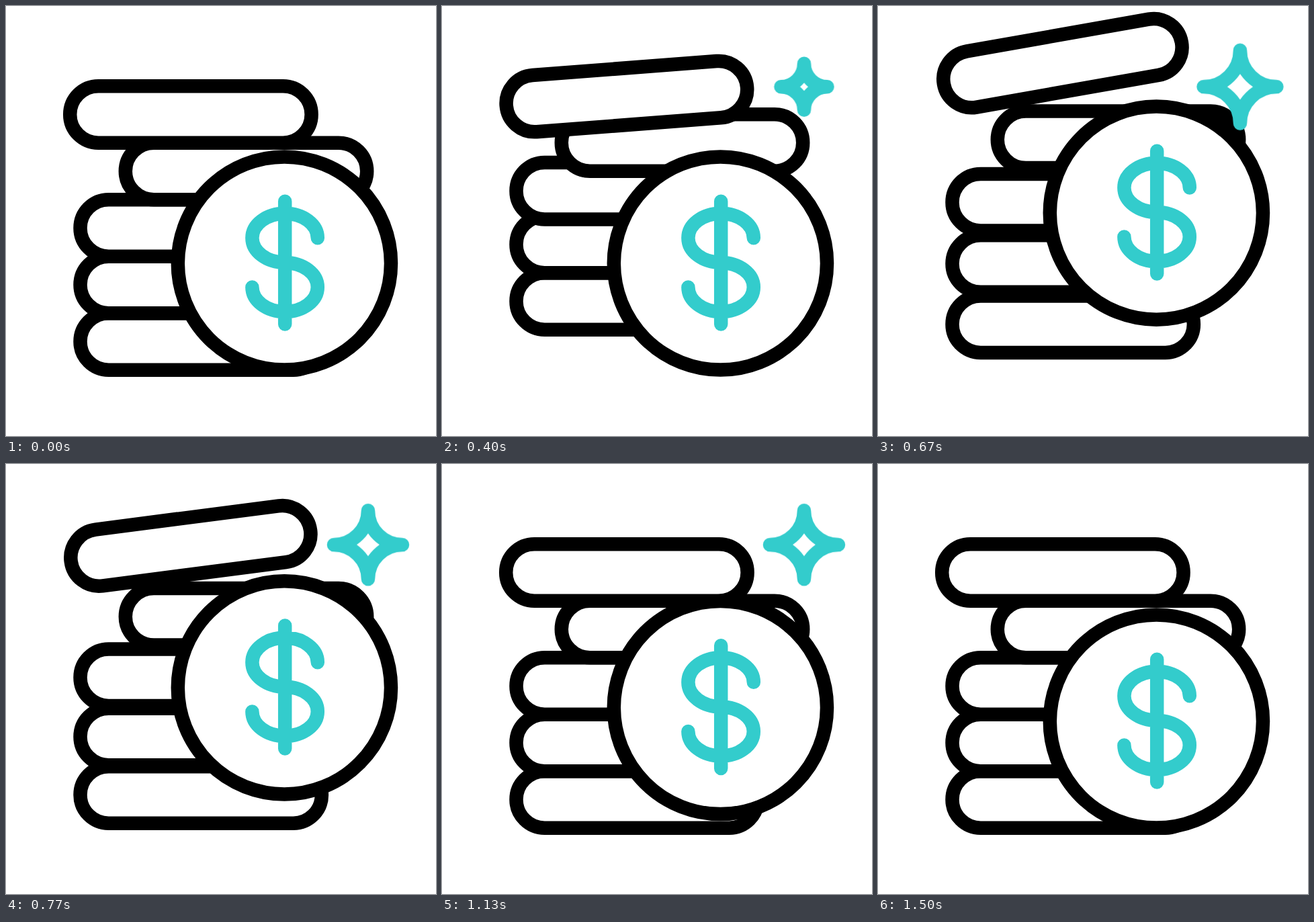
Animation of 640 by 640 pixels, one loop 2000 ms. Source, as an HTML page:

```html
<!DOCTYPE html>
<html lang="en">
<head>
<meta charset="utf-8">
<title>Coin stack</title>
<style>
  html, body { margin: 0; width: 100%; height: 100%; overflow: hidden; background: #fff; }
  svg { display: block; width: 100vw; height: 100vh; }

  .ink { fill: #fff; stroke: #000; stroke-width: 20.5; }
  .accent { fill: none; stroke: #3cc; stroke-width: 20.5; stroke-linecap: round; stroke-linejoin: round; }

  .move {
    animation-duration: 2s;
    animation-iteration-count: infinite;
    animation-timing-function: cubic-bezier(.333, 0, .667, 1);
  }
  .bar1 { animation-name: lift1, tilt; transform-box: fill-box; transform-origin: center; }
  .bar2 { animation-name: lift2; }
  .bar3 { animation-name: lift3; }
  .bar4 { animation-name: lift4; }
  .bar5 { animation-name: lift5; }
  .coin { animation-name: hop; }
  .star { animation-name: pop; vector-effect: non-scaling-stroke; }

  @keyframes lift5 {
    0%, 42.95%, 100% { translate: 0 0; }
    16.65%, 22.2% { translate: 0 -60px; }
  }
  @keyframes lift4 {
    0%, 3.1%, 43.1%, 100% { translate: 0 0; }
    19.8%, 24.55% { translate: 0 -60px; }
  }
  @keyframes lift3 {
    0%, 6.25%, 43.55%, 100% { translate: 0 0; }
    22.9%, 26.7% { translate: 0 -60px; }
  }
  @keyframes lift2 {
    0%, 9.35%, 44.15%, 100% { translate: 0 0; }
    26%, 29.05% { translate: 0 -60px; }
  }
  @keyframes lift1 {
    0%, 13.5%, 45.65%, 100% { translate: 0 0; }
    30.75%, 31% { translate: 0 -83px; }
  }
  @keyframes tilt {
    0%, 8.35%, 47.65%, 100% { rotate: 0deg; }
    33.95% { rotate: -10deg; }
  }
  @keyframes hop {
    0%, 22.05%, 46.1%, 67.5%, 100% { translate: 0 0; }
    33.8% { translate: 0 -75px; }
    56.65% { translate: 0 -20.5px; }
  }
  @keyframes pop {
    0%, 15%, 75%, 100% { transform: scale(0); }
    25%, 66% { transform: scale(1.333); }
    37%, 57.5% { transform: scale(1); }
  }
</style>
</head>
<body>
<svg viewBox="0 0 640 640">
  <defs>
    <rect id="bar" width="359.4" height="84.5" rx="42.25"/>
  </defs>
  <g class="ink">
    <g class="move bar5"><use href="#bar" x="110.5" y="457.2"/></g>
    <g class="move bar4"><use href="#bar" x="110.5" y="372.7"/></g>
    <g class="move bar3"><use href="#bar" x="110.5" y="288.2"/></g>
    <g class="move bar2"><use href="#bar" x="177.8" y="203.7"/></g>
    <g class="move bar1"><use href="#bar" x="95.2" y="119.2"/></g>
  </g>
  <g class="move coin">
    <circle class="ink" cx="414.4" cy="383" r="158.6"/>
    <path class="accent" d="M415.2 290.7V473.5M463.8 345.3A48.7 36.6 0 1 0 415.1 381.9A48.7 36.6 0 1 1 366.4 418.5"/>
  </g>
  <g transform="translate(538.9 120.2)">
    <path class="accent move star" d="M0-51A51 51 0 0 0 51 0A51 51 0 0 0 0 51A51 51 0 0 0-51 0A51 51 0 0 0 0-51Z"/>
  </g>
</svg>
</body>
</html>
```
